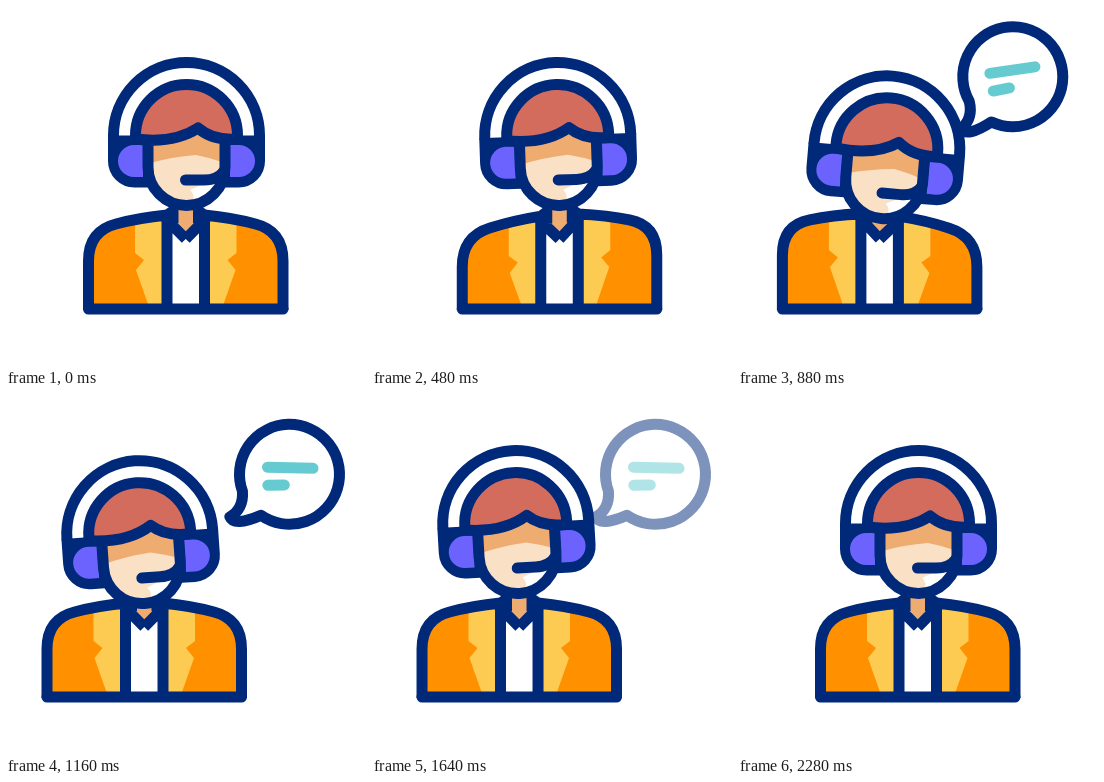
Recreate the animation shown at these times as an HTML page. Size 360 by 360 pixels, loop 3 s.

```html
<!DOCTYPE html>
<html lang="en">
<head>
<meta charset="utf-8">
<title>Support agent</title>
<style>
  html, body { margin: 0; height: 100%; overflow: hidden; background: #fff; }
  svg { display: block; width: 100vw; height: 100vh; }
  .line { stroke: #00297a; stroke-width: 11; stroke-linejoin: round; }
  .round { stroke-linecap: round; }
</style>
</head>
<body>
<svg viewBox="0 0 360 360" fill="none">
  <defs>
    <clipPath id="aboveHem"><path d="M60 180H300V304H60Z"/></clipPath>
    <clipPath id="faceClip"><path d="M142 128V161A38.5 38.5 0 0 0 219 161V128Z"/></clipPath>
    <g id="jacket">
      <path fill="#ff9100" d="M82.5 315V255Q82.5 225 110 218Q132 212 161 209V315Z"/>
      <path fill="#fecb52" d="M129 214V247L138 254L130 264L142 298V315H161V209Z"/>
      <path class="line" d="M82.5 315V255Q82.5 225 110 218Q132 212 161 209V315M161 209L167 205V217M163 216L179.75 233"/>
    </g>
    <g id="ear">
      <path class="line" fill="#00297a" d="M107.5 130V155A21 21 0 0 0 128.5 176H142V135H107.5"/>
      <path fill="#6c63ff" d="M137 139H128A16 16 0 0 0 128 171H137Z"/>
    </g>
  </defs>

  <g id="bubble">
    <path class="line" fill="#fff" d="M237 97.5Q238 115 224 123Q228 133 255 122A50 50 0 1 0 237 97.5Z"/>
    <path class="round" stroke="#66cbd1" stroke-width="11" d="M262.5 74L308 76M262.5 92H279"/>
  </g>

  <g id="body">
    <g clip-path="url(#aboveHem)">
      <g id="torso">
        <path fill="#fff" d="M161 208H198V315H161Z"/>
        <path fill="#efac70" d="M164 195H195V217L179.75 233L164 217Z"/>
        <use href="#jacket"/>
        <use href="#jacket" transform="matrix(-1 0 0 1 359.5 0)"/>
      </g>
    </g>
    <path class="line round" d="M82.5 303H277"/>

    <g id="head">
      <path class="line" d="M107.5 131V129.5A73 73 0 0 1 253.5 129.5V131"/>
      <use href="#ear"/>
      <use href="#ear" transform="matrix(-1 0 0 1 361 0)"/>
      <g clip-path="url(#faceClip)">
        <path fill="#fae0c4" d="M140 120H222V202H140Z"/>
        <path fill="#efac70" d="M140 120H222V158Q206 152 190 149Q165 151 140 158Z"/>
        <path fill="#fff" d="M184 202Q191 190 184 184L197 178H222V202Z"/>
      </g>
      <path class="line" d="M142 134V161A38.5 38.5 0 0 0 219 161V134"/>
      <path class="line" fill="#d46c5d" d="M129.5 133V129.5A51 51 0 0 1 231.5 129.5V133Q207 135 192 122Q168 138 129.5 133Z"/>
      <path class="line round" d="M179.5 174H198Q212 174 218 165"/>
    </g>
  </g>
</svg>
<script>
const LOOP = 3000, STEP = 40;
const part = id => document.getElementById(id);
const [bubble, body, torso, head] = ['bubble', 'body', 'torso', 'head'].map(part);
const set = (el, value) => el.setAttribute('transform', value);

function draw(now) {
  const t = Math.floor(now % LOOP / STEP) * STEP;
  // Smooth rise from 0 to 1 between two times.
  const ease = (from, to) => {
    const u = Math.min(1, Math.max(0, (t - from) / (to - from)));
    return u * u * (3 - 2 * u);
  };

  const windUp = ease(160, 460);
  const slide = 8 * windUp - 49.5 * ease(460, 960) + 41.5 * ease(1390, 2220);
  const lean = -3.4 * windUp + 6.8 * ease(460, 880) - 3.4 * ease(880, 1160);
  const tilt = -2 * windUp + 7 * ease(460, 860) - 9 * ease(860, 1150) + 4 * ease(1520, 1960);
  const nod = 13 * ease(520, 880) - 3 * ease(880, 1160) - 10 * ease(1160, 1600);
  const sway = -4 + 9 * Math.sin(2 * Math.PI * (t - 945) / 480);

  set(body, `translate(${slide} 0)`);
  set(torso, `translate(180 0) skewY(${lean}) translate(-180 0)`);
  set(head, `translate(0 ${nod}) rotate(${tilt} 180 205)`);
  set(bubble, `translate(222 127) rotate(${sway}) scale(${ease(540, 700)}) translate(-222 -127)`);
  bubble.setAttribute('opacity', ease(540, 660) - ease(1500, 1780));
}

const start = performance.now();
function tick() {
  draw(performance.now() - start);
  requestAnimationFrame(tick);
}
tick();
</script>
</body>
</html>
```
